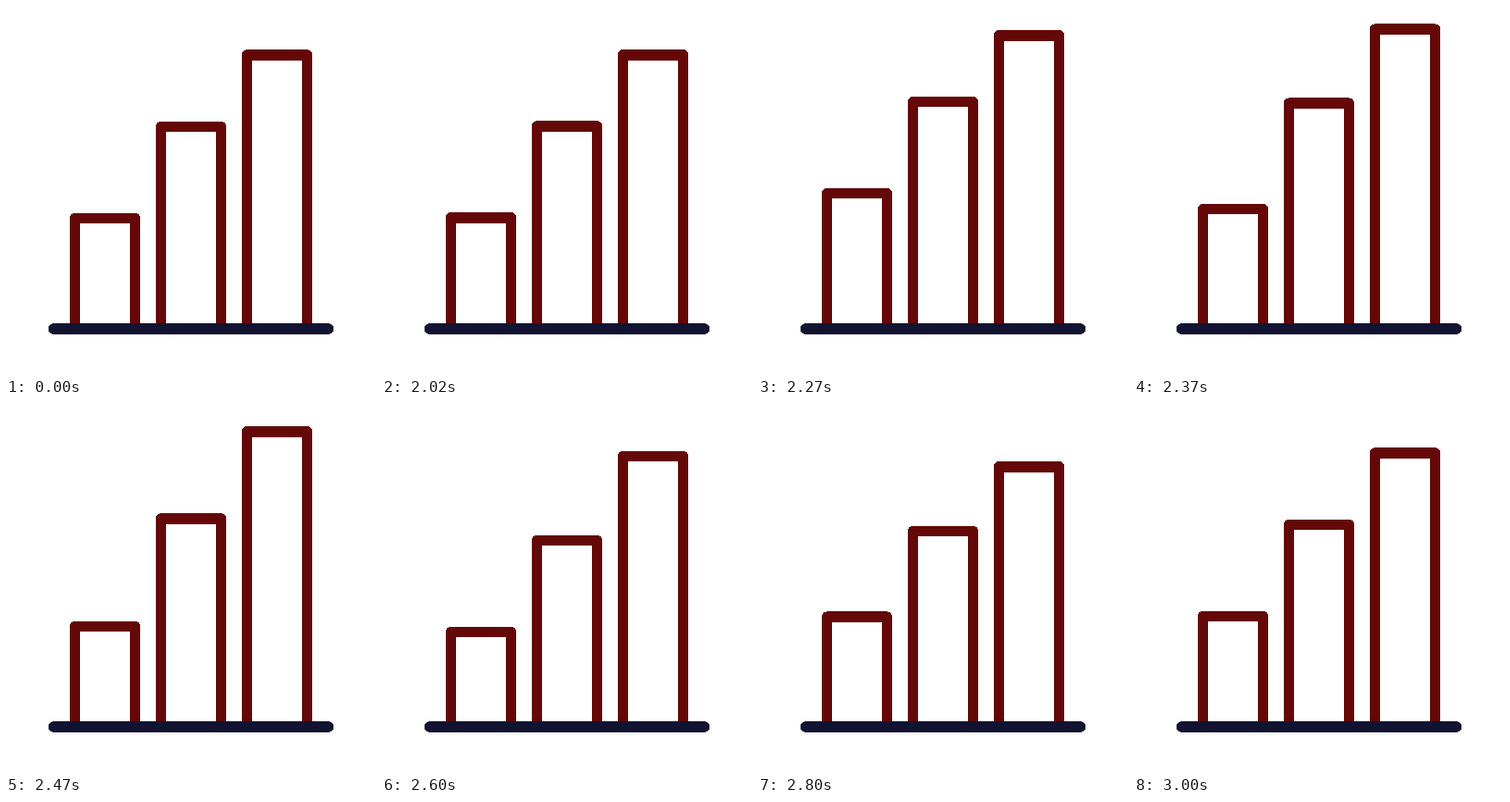
Recreate the animation shown at these times as an HTML page. Size 400 px wide and 400 px high, loop 3020 ms.

```html
<!DOCTYPE html>
<html lang="en">
<head>
<meta charset="utf-8">
<title>Bar chart</title>
<style>
  html, body { margin: 0; width: 100%; height: 100%; overflow: hidden; background: #fff; }
  svg { display: block; width: 100%; height: 100%; shape-rendering: crispEdges; }
  path { fill: none; stroke-width: 11.5; stroke-linejoin: round; }
  .bar { stroke: #640808; }
  .base { stroke: #121331; stroke-linecap: round; }
</style>
</head>
<body>
<svg viewBox="0 0 400 400">
  <path class="bar"/>
  <path class="bar"/>
  <path class="bar"/>
  <path class="base" d="M51.5 349H348.5"/>
</svg>
<script>
const LOOP = 3020, HOLD = 2020, START = 2000;
const RISE = 235, DELAY = 85, FALL = 315, SETTLE = 285;
const PEAK = -28.5, DIP = 18.5;
const BASE = 349, LEFT = 74.5, STEP = 93, WIDTH = 65;
const tops = [229.5, 130.4, 53];
const bars = document.querySelectorAll('.bar');

// Eased progress from 0 to 1 over a span of time
function ease(t, from, span) {
  const u = Math.min(1, Math.max(0, (t - from) / span));
  return u * u * (3 - 2 * u);
}

// All bars leave together; each later one rises longer
function offset(i, t) {
  if (t < HOLD) return 0;
  const rise = RISE + DELAY * i;
  const peak = START + rise, dip = peak + FALL;
  return PEAK * ease(t, START, rise)
    + (DIP - PEAK) * ease(t, peak, FALL)
    - DIP * ease(t, dip, SETTLE);
}

function draw() {
  const t = performance.now() % LOOP;
  bars.forEach((bar, i) => {
    const y = tops[i] + offset(i, t);
    bar.setAttribute('d', `M${LEFT + STEP * i} ${BASE}V${y.toFixed(2)}h${WIDTH}V${BASE}`);
  });
  requestAnimationFrame(draw);
}
draw();
</script>
</body>
</html>
```
